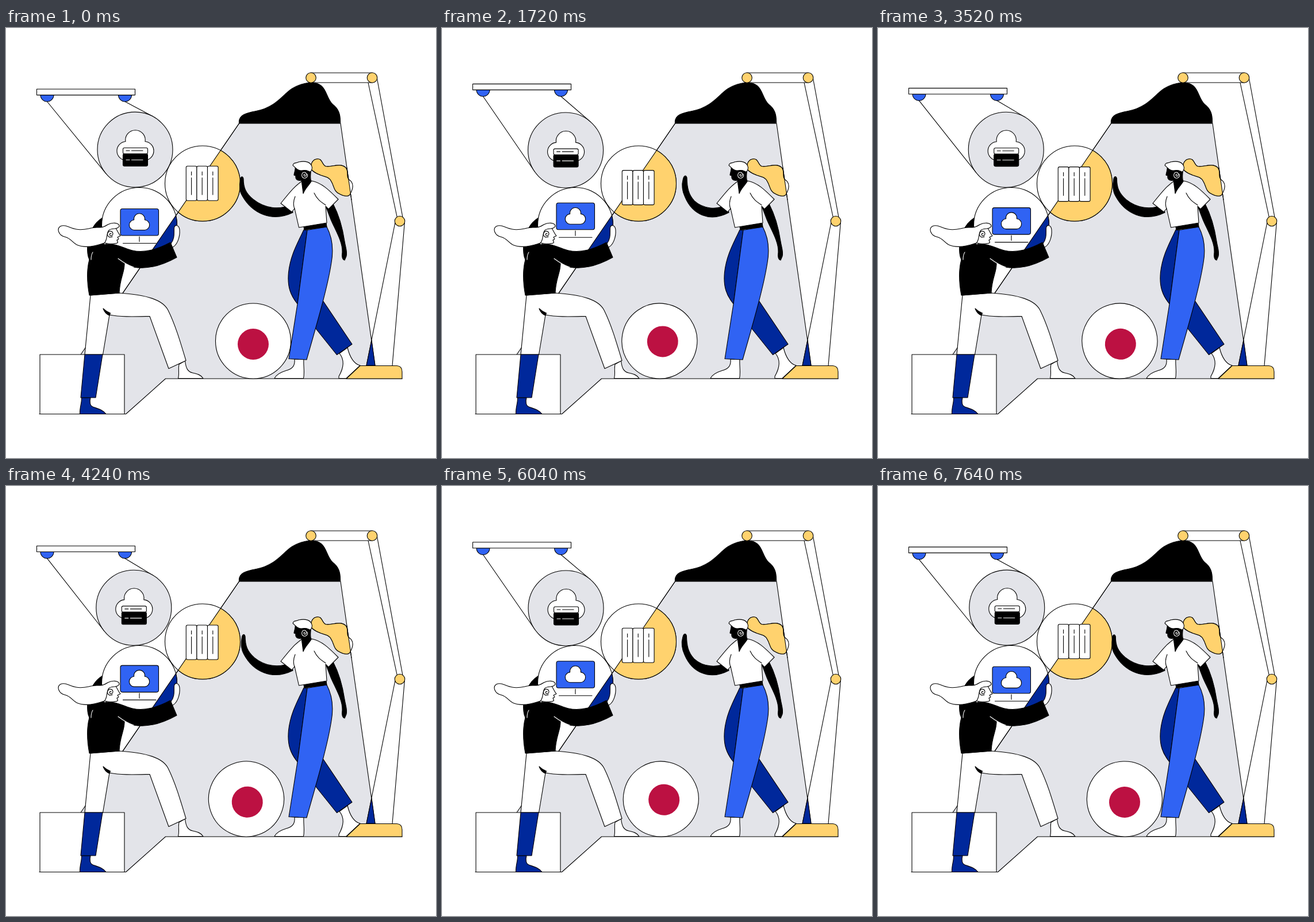
Animation, 748 px wide and 748 px high, one loop 7.68 s. Source, as an HTML page:

```html
<!DOCTYPE html>
<html lang="en">
<head>
<meta charset="utf-8">
<title>Cloud workshop</title>
<style>
  html, body { margin: 0; width: 100%; height: 100%; overflow: hidden; background: #fff; }
  svg { display: block; width: 100%; height: 100%; fill: #fff; stroke: #000; stroke-width: 1.1; stroke-linejoin: round; stroke-linecap: round; }
  .gray { fill: #e3e4e9; }
  .blue { fill: #3063f3; }
  .navy { fill: #00289b; }
  .gold { fill: #ffd26e; }
  .ink { fill: #000; }
  .line { fill: none; }
  .bare { stroke: none; }
  .white-line { fill: none; stroke: #fff; }
</style>
</head>
<body>
<svg viewBox="0 0 748 748">
  <defs>
    <clipPath id="beam"><path d="M405.5 166H582L642 587V610H101Z"/></clipPath>
    <path id="cloud" d="M-17 16.500A16.300 16.300 0 0 1 -17 -16A17.200 17.200 0 1 1 17 -16A16.300 16.300 0 0 1 17 16.500Z"/>
  </defs>

  <!-- light and floor -->
  <path class="gray bare" d="M405.5 166H582L642 587L616 588L592 610H277.500L208.500 671.500H206V568H130Z"/>
  <path class="line" d="M405.5 166L130 568M582 166L642 587M58 671.500H208.500L277.500 610H689"/>

  <!-- lamp -->
  <path class="line" d="M530 78H637M530 95H637M630 95L680.500 330M645.500 88L690 329M677 338L627 587M693.500 337L672 587"/>
  <path class="navy" d="M636 543L627 587H642Z"/>
  <path class="ink" d="M405.500 166C404 152 416 148 435 144.500C461 140 475 125 488 113C504 97 536 89 549 101C558 109 559 124 568 132.500C579 141 582 150 581.500 166Z"/>
  <g class="gold">
    <circle cx="530.500" cy="86.500" r="8.800"/>
    <circle cx="637" cy="86.500" r="8.800"/>
    <circle cx="685" cy="336" r="8.800"/>
  </g>

  <!-- pulley -->
  <path id="belts" class="line"/>
  <g id="pulley">
    <path class="blue" d="M60 116.500A11.500 11.500 0 0 0 83 116.500ZM195.500 116.500A11.500 11.500 0 0 0 218.500 116.500Z"/>
    <rect x="53.500" y="106.300" width="171" height="10.300"/>
  </g>

  <!-- far arm of the carrier -->
  <path class="ink" d="M168 330C155 338 145 352 142 376C141 388 142 397 145 403L170 385V345Z"/>

  <!-- balls -->
  <circle id="topBall" class="gray" r="65.500"/>
  <g id="serverCloud">
    <use href="#cloud" x="225" y="213.500"/>
    <rect x="203.500" y="208.500" width="43" height="10.500" rx="2.500"/>
    <rect class="ink" x="203.500" y="219" width="43" height="21.300" rx="2.500"/>
    <path class="line" d="M209 213.500H215M218.500 213.500H238"/>
    <path class="white-line" d="M209 229.500H215M218.500 229.500H238"/>
  </g>

  <circle cx="232" cy="343" r="65.500"/>
  <circle class="navy" cx="232" cy="343" r="65.500" clip-path="url(#beam)"/>
  <circle cx="342" cy="270.500" r="65.500"/>
  <circle class="gold" cx="342" cy="270.500" r="65.500" clip-path="url(#beam)"/>
  <path class="line" d="M405.500 166L203 461"/>

  <g id="monitor">
    <rect class="blue" x="199" y="314.500" width="66.500" height="46.500" rx="3.500"/>
    <use href="#cloud" transform="translate(232 342.500) scale(.55)" stroke-width="2"/>
    <path class="line" d="M232 363V371.500M203.500 374.500H261"/>
  </g>
  <g id="servers"></g>

  <g id="rollingBall">
    <circle r="65.500"/>
    <circle class="bare" cy="5.500" r="27" fill="#bc1142"/>
  </g>

  <!-- carrier -->
  <rect x="59" y="568" width="147" height="103.500"/>
  <path d="M301 585C299 594 302 600 299.500 609.500H343C339 603 332 601.500 325 600C316 598 313 592 311.500 579Z"/>
  <path d="M147 465L137 568H168.500L180 499C200 503 225 502 250 501.500L283 592.500L313 578.500C303 545 294 515 282 491C273 473 245 464 197 461Z"/>
  <path class="ink" d="M169 488C171 494 175 498 180 500L181.500 496C176 494 172 491 169 488Z"/>
  <path class="navy" d="M131.500 643C132 652 128 660 128.500 671.500H174C169 664 159 662 151 659C146 657 145 650 147 643Z"/>
  <path class="navy" d="M137 568L130 643H156L168 568Z"/>
  <path d="M287 375C294 366 292 356 292.500 348C293 341 301 342 302 351C303 363 298 379 288 382Z"/>
  <path class="ink" d="M145 465C139 433 141 405 151 388C156 378 165 376 180 376C195 376 207 384 220 387C243 392 265 384 286 373L297 399C270 414 245 420 222 416L206 408C207 424 198 435 197 461Z"/>
  <path class="white-line" d="M195 401C203 407 212 413 222 416M148 403C148 397 149 393 151 390"/>
  <path d="M169 350L171 374L181 375.500C187 375 193 376 194.500 373L193 369L196 367L194 364L199 361.500C195 357 194 352 190 347Z"/>
  <path d="M197 345C197 338 184 338 177 342C169 347 167 347 158 347C145 347 137 353 122 350C111 348 103 341 94.500 345C88 349 91 361 103 363.500C113 366 115 373 123 377C138 384 157 379 171 374C177 369 174 357 179 352C184 347 193 352 197 345Z"/>
  <path class="line" d="M183 358C181 356 179 359 181 361C185 363 188 358 184 354C180 352 175 356 177 361C178 364 182 365 185 363"/>

  <!-- pusher -->
  <path id="pushArm" class="ink"/>
  <path class="ink" d="M557 312L569 306C579 325 585 345 589 371C591 383 594 390 592 397L589 404C585 403 584 397 585 390C586 372 572 350 565 333Z"/>
  <path d="M580 566C590 578 587 592 579 606V609.500H592L616 587C606 585 598 573 594 556Z"/>
  <path class="navy" d="M551 474L602 550L575.500 568.500L535 518Z"/>
  <path class="navy" d="M518 351C508 373 495 394 491.500 425C489 450 495 465 507 480L524 352Z"/>
  <path d="M502 576C503 588 498 593 487 596C477 599 470 603 467 609.500H517.500C520 598 517 588 518 576Z"/>
  <path class="blue" d="M524 351.500L558 346C568 365 570 385 566 408C559 453 542 510 523 577L492 575.500L507 480Z"/>
  <path class="ink" d="M518 346L557 339L558 346L519 351Z"/>
  <path d="M514 267C503 275 498 280 478 305L497 320L502 314L509.500 347L558 339L556 310L561 315L578 298C562 282 549 269 532 266Z"/>
  <path class="line" d="M503 293C500 300 499 307 502 315M536 287C541 298 547 302 556 308"/>
  <path class="ink" d="M503 241C504 247 501 252 501 256L504 257C503 263 506 266 514 265L516 280L517 288C521 278 526 275 531 267C528 260 531 252 530 246Z"/>
  <path id="tail" d="M532 247C528 239 533 229 540 228C551 226 549 238 556 240.500C566 243 580 234 590 242C598 249 590 258 597 264C606 270 604 279 599 288C597 294 589 293 581 289C570 285 571 275 566 267C561 255 545 260 532 247Z"/>
  <use href="#tail" class="gold" clip-path="url(#beam)"/>
  <path class="line" d="M593 243L601 299"/>
  <path d="M499 239C500 233 505 236 509 233C520 231 531 232 532.500 243C532 248 530 252 526 249C519 245 515 250 509 247C504 245 502 241 499 239Z"/>
  <path class="white-line" d="M520 255C518 253 517 257 520 258C524 257 523 251 519 251C514 251 513 259 518 261C522 262 526 258 524 254"/>

  <path class="gold" d="M616 587.500H680Q689 588 689 598V610H592Z"/>
</svg>

<script>
  const HALF_CYCLE = 1920;
  const RADIUS = 65.5;
  const ARM_REACHED = "M497 307C475 317 450 314 430 298C417 287 413 278 413 262C412 257 408 258 407.500 264C406 272 406 284 411 292C428 322 462 339 499 321Z";
  const ARM_DRAWN = "M497 307C478 317 455 315 440 301C430 290 428 278 427.500 260C426 255 422 256 420.500 264C418 272 419 284 424 294C436 324 465 339 499 321Z";
  const NUMBER = /\d+(\.\d+)?/g;

  const byId = id => document.getElementById(id);
  const place = (id, x, y, turn = 0) =>
    byId(id).setAttribute("transform", `translate(${x} ${y}) rotate(${turn})`);

  const drawnNumbers = ARM_DRAWN.match(NUMBER).map(Number);
  function armPath(p) {
    let i = 0;
    return ARM_REACHED.replace(NUMBER, n => +n + (drawnNumbers[i++] - n) * p);
  }

  // Line from a point to where it touches the ball, on the chosen side.
  function tangent(x, y, cx, cy, side) {
    const dist = Math.hypot(cx - x, cy - y);
    const angle = Math.atan2(cy - y, cx - x) + side * Math.asin(RADIUS / dist);
    const length = Math.sqrt(dist * dist - RADIUS * RADIUS);
    return `M${x} ${y}L${x + length * Math.cos(angle)} ${y + length * Math.sin(angle)}`;
  }

  byId("servers").innerHTML = [0, 1, 2].map(i => {
    const x = 313.3 + i * 18.6;
    return `<rect x="${x}" y="240.300" width="18.600" height="60" rx="2.500"/>
      <path class="line" d="M${x + 9.3} 250V256M${x + 9.3} 260.500V290"/>`;
  }).join("");

  function draw(time) {
    const phase = time % (2 * HALF_CYCLE) / HALF_CYCLE;
    const p = phase < 1 ? phase : 2 - phase;

    const lift = -10 * p;
    const ballX = 224.5 - 10.5 * p;
    const ballY = 343 - Math.sqrt(131.6 ** 2 - (232 - ballX) ** 2);

    place("pulley", 0, lift);
    place("topBall", ballX, ballY);
    place("serverCloud", -10.5 * p, 1.8 * p);
    byId("belts").setAttribute("d",
      tangent(71.5, 128 + lift, ballX, ballY, 1) + tangent(207, 128 + lift, ballX, ballY, -1));

    place("monitor", 0, -11.5 * p);
    place("servers", 0, 8.2 * p);
    place("rollingBall", 430 - 57.6 * p, 544.5, -90 * p);
    byId("pushArm").setAttribute("d", armPath(p));
  }

  const start = performance.now();
  function tick() {
    draw(performance.now() - start);
    requestAnimationFrame(tick);
  }
  draw(0);
  requestAnimationFrame(tick);
</script>
</body>
</html>
```
